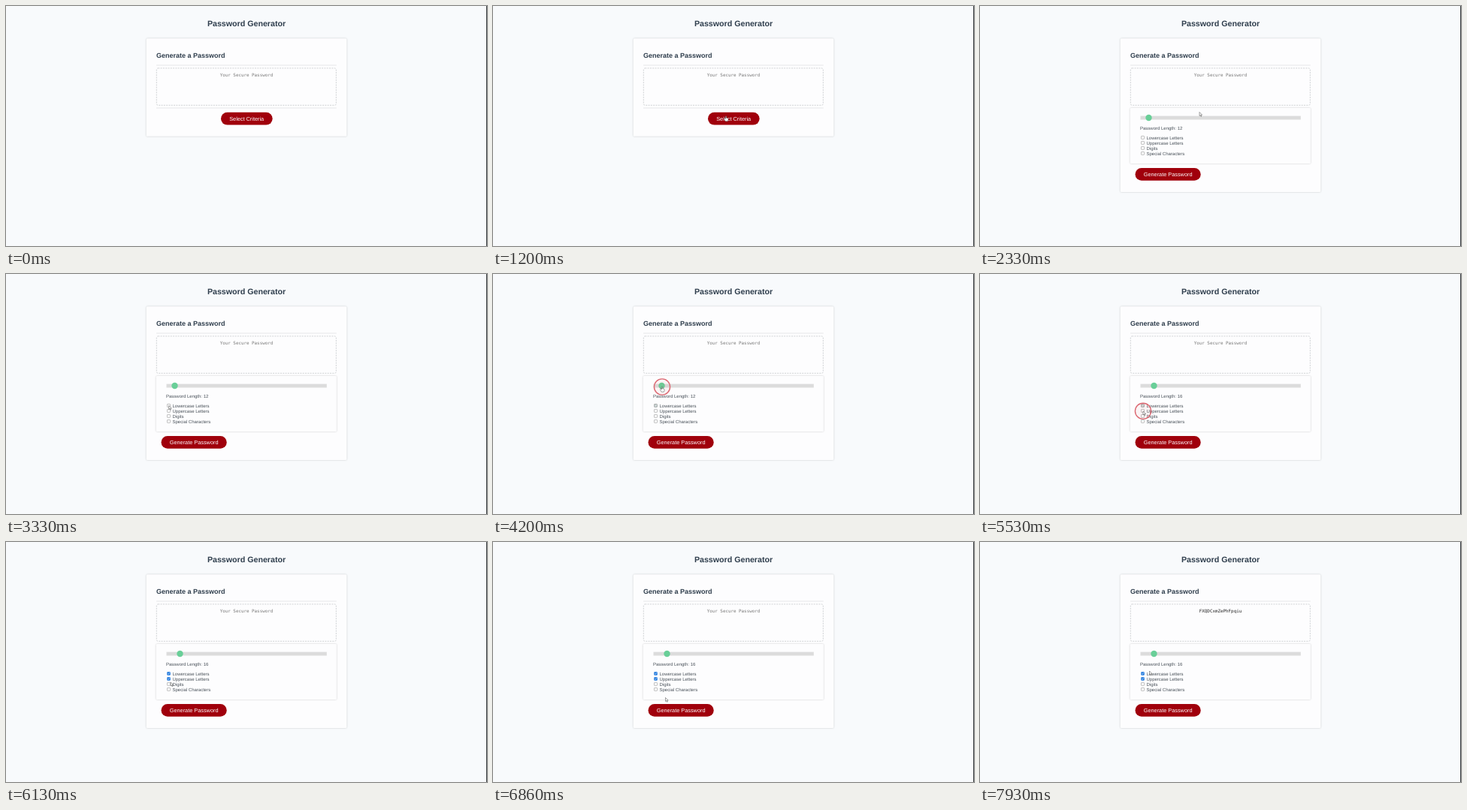
An HTML page for the animation above (8000 ms loop, 640x320 px).

```html
<!DOCTYPE html>
<html lang="en">
<head>
<meta charset="utf-8">
<title>Password Generator</title>
<style>
  html, body { margin: 0; width: 100%; height: 100%; overflow: hidden; background: #f8fafc; }
  svg { display: block; width: 100%; height: 100%; font-family: "Liberation Sans", Arial, sans-serif; text-rendering: geometricPrecision; }
  text { fill: #485058; font-size: 6px; }
  .heading { fill: #2f3e4d; font-weight: bold; }
  .mono { font: 5.867px "DejaVu Sans Mono", monospace; text-anchor: middle; }
  .button rect { fill: #a0000c; }
  .button text { fill: #fff; font-size: 7.333px; text-anchor: middle; }
  .sheet { fill: #fdfdfe; filter: drop-shadow(0 .7px 1.3px rgba(0, 0, 0, .2)); }
  .rule { stroke: #dcdddf; stroke-width: .7; }
  .tick { fill: none; stroke: #fff; stroke-width: .7; }
  .pointer { fill: #fff; stroke: #333; stroke-width: .45; stroke-linejoin: round; }
</style>
</head>
<body>
<svg viewBox="0 0 640 320">
  <rect width="640" height="320" fill="#f8fafc"/>
  <rect x="639" width="1" height="320" fill="#34383c"/>
  <text class="heading" x="320" y="26.7" text-anchor="middle" style="font-size:10.667px">Password Generator</text>
  <rect id="card" class="sheet" x="186.7" y="43.3" width="266.6" height="130.5" rx="1.6"/>
  <text class="heading" x="200" y="68.7" style="font-size:9px">Generate a Password</text>
  <path class="rule" d="M200 79H439.7"/>
  <rect x="200.3" y="82.9" width="239" height="49.4" rx="2" fill="none" stroke="#c5c7c9" stroke-width=".8" stroke-dasharray="2 1.3"/>
  <text id="output" class="mono" x="320" y="94.4"></text>

  <g id="intro">
    <path class="rule" d="M200 136H439.7"/>
    <g class="button">
      <rect x="286" y="141.7" width="68.6" height="16.9" rx="8.45"/>
      <text x="320.2" y="152.7">Select Criteria</text>
    </g>
  </g>

  <g id="criteria">
    <rect class="sheet" x="199.8" y="136" width="240" height="74" rx="1.3"/>
    <rect x="213.5" y="146.6" width="213.3" height="4.9" fill="#dcdcdc"/>
    <circle id="thumb" cy="149" r="4.2" fill="#69cf98"/>
    <text id="length" x="213" y="164.5"></text>
    <g id="options"></g>
    <g class="button">
      <rect x="206.5" y="216" width="87.2" height="16.8" rx="8.4"/>
      <text x="250.1" y="227.1">Generate Password</text>
    </g>
  </g>

  <circle id="ring" r="10.6" fill="rgba(210, 70, 85, .05)" stroke="#dc6872" stroke-width="1.4"/>
  <g id="cursor" class="pointer">
    <path id="arrow" d="M0 0V5L1.2 4 2 5.9 2.8 5.5 2 3.7H3.6Z"/>
    <path id="hand" d="M-.6 0Q0-.6.6 0V2.2Q2.8 2.3 3 3.4V5L2.3 6.7H-.8L-2.3 4.2Q-2-.1-.6 3.6Z"/>
  </g>
</svg>
<script>
const LOOP = 8000;
const PANEL_OPENS = 2000, PASSWORD_READY = 7300;
const LOWER_CLICK = 3500, UPPER_CLICK = 5650;
const DRAG_START = 4350, DRAG_END = 4950;

// time, x, y, pointer used from here on
const path = [
  [60, 274, 22, "arrow"], [600, 310, 147, "hand"], [2000, 310, 147, "arrow"],
  [2300, 292, 141.5, "arrow"], [2660, 292, 141.5, "arrow"], [3350, 216.5, 175.5, "arrow"],
  [3750, 216.5, 175.5, "arrow"], [4080, 225, 150.5, "hand"], [DRAG_START, 225, 150.5, "hand"],
  [DRAG_END, 232, 150.5, "hand"], [5050, 232, 150.5, "arrow"], [5400, 217, 182.8, "arrow"],
  [5900, 217, 182.8, "arrow"], [6800, 229.5, 207.5, "arrow"], [6900, 229.5, 207.5, "arrow"],
  [7120, 235, 222, "hand"], [7480, 235, 222, "arrow"], [7920, 225.5, 172, "arrow"],
  [LOOP, 225.5, 172, "arrow"]
];
const presses = [[1800, 2000], [3420, 3700], [4100, 5000], [5440, 5760], [7180, 7420]];

const el = id => document.getElementById(id);
const show = (node, visible) => node.style.display = visible ? "" : "none";
const ease = p => p * p * (3 - 2 * p);
const progress = (t, from, to) => ease(Math.min(1, Math.max(0, (t - from) / (to - from))));

const labels = ["Lowercase Letters", "Uppercase Letters", "Digits", "Special Characters"];
el("options").innerHTML = labels.map((label, i) => {
  const y = 175.4 + i * 7;
  return `<rect x="214.5" y="${y - 2}" width="4" height="4" rx=".6" stroke="#777" stroke-width=".45"/>
    <path class="tick" d="M215.3 ${y}l.9 1 1.6-2"/>
    <text x="221.5" y="${y + 2.2}">${label}</text>`;
}).join("");
const boxes = [...document.querySelectorAll("#options rect")];
const ticks = [...document.querySelectorAll(".tick")];

function setBox(index, color) {
  boxes[index].setAttribute("fill", color || "#fff");
  boxes[index].setAttribute("stroke", color === "#1673dc" ? color : "#777");
  show(ticks[index], color);
}

function cursorAt(t) {
  const next = Math.max(1, path.findIndex(key => key[0] > t));
  const [t0, x0, y0, kind] = path[next - 1];
  const [t1, x1, y1] = path[next];
  const p = progress(t, t0, t1);
  return { x: x0 + (x1 - x0) * p, y: y0 + (y1 - y0) * p, kind };
}

function render(t) {
  const open = t >= PANEL_OPENS, ready = t >= PASSWORD_READY;
  show(el("intro"), !open);
  show(el("criteria"), open);
  el("card").setAttribute("height", open ? 204.7 : 130.5);
  el("output").textContent = ready ? "FXQDCxmZePhFpqiu" : "Your Secure Password";
  el("output").style.fill = ready ? "#222" : "#777";

  const length = Math.round(12 + 4 * progress(t, DRAG_START, DRAG_END));
  el("length").textContent = `Password Length: ${length}`;
  el("thumb").setAttribute("cx", 224.5 + (length - 12) * 1.75);

  const blue = t >= UPPER_CLICK && "#1673dc";
  setBox(0, blue || (t >= LOWER_CLICK && "#b9c6c5"));
  setBox(1, blue);
  setBox(2, false);
  setBox(3, false);

  const { x, y, kind } = cursorAt(t);
  const place = `translate(${x} ${y})`;
  show(el("cursor"), t >= 60);
  el("cursor").setAttribute("transform", place);
  show(el("arrow"), kind === "arrow");
  show(el("hand"), kind === "hand");
  el("ring").setAttribute("transform", place);
  show(el("ring"), presses.some(([down, up]) => t >= down && t < up));
}

const start = performance.now();
function frame() {
  render((performance.now() - start) % LOOP);
  requestAnimationFrame(frame);
}
frame();
</script>
</body>
</html>
```
